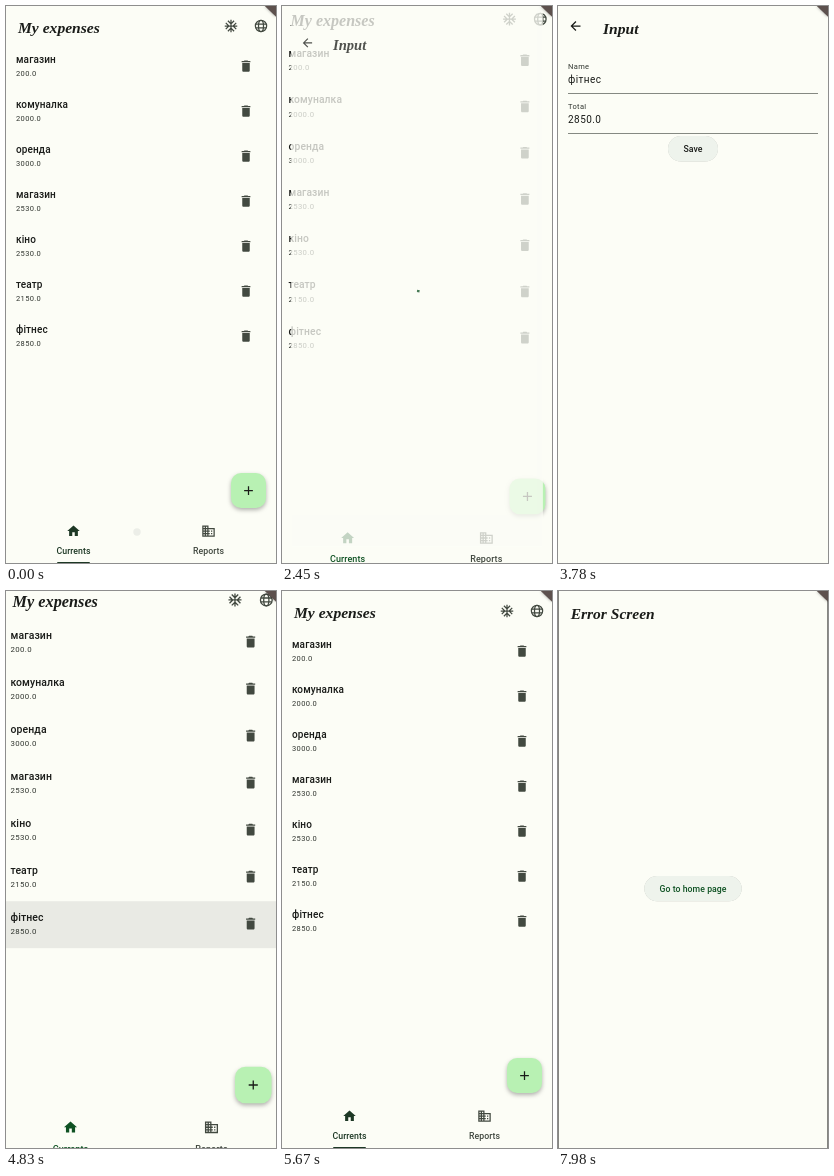
An HTML page for the animation above (8 s loop, 270 px wide and 557 px high).

```html
<!DOCTYPE html>
<html lang="uk">
<head>
<meta charset="utf-8">
<title>My expenses</title>
<style>
  html, body { margin: 0; width: 100%; height: 100%; overflow: hidden; background: #fcfdf6; }
  svg { display: block; width: 100vw; height: 100vh; }
  text { font-family: Roboto, "Noto Sans", sans-serif; fill: #1a1c19; }
  .script { font: italic bold 15.6px "Liberation Serif", serif; }
  .item { font-size: 10px; font-weight: 500; letter-spacing: .1px; }
  .small { font-size: 7.5px; letter-spacing: .35px; fill: #30352f; }
  .value { font-size: 10px; letter-spacing: .45px; }
  .label { font-size: 8.75px; font-weight: 500; letter-spacing: .06px; text-anchor: middle; }
  .icon { fill: #424940; }
  .line { fill: none; stroke: #424940; stroke-width: 2; }
  .dark { fill: #1a1c19; }
  .accent { fill: var(--accent); }
  .page { fill: #fcfdf6; }
  .pill { fill: #eef3ec; filter: drop-shadow(0 .8px .4px rgba(0,0,0,.25)); }
  .fab { fill: #b8f1b3; filter: drop-shadow(0 2px 2px rgba(0,0,0,.3)); }
  .banner { fill: #5d514e; filter: drop-shadow(0 0 1.5px rgba(0,0,0,.4)); }
</style>
</head>
<body>
<svg viewBox="0 0 270 557" preserveAspectRatio="none">
  <g id="home"></g>
  <rect id="scrim" width="270" height="557"/>
  <g id="input"></g>
  <g id="error"></g>
  <path class="banner" d="M258.8 0H270V10.8Z"/>
</svg>
<script>
const $ = id => document.getElementById(id);
const LOOP = 8000, STEP = 70, CX = 135, CY = 270;
const GREEN = '#0f5223';

const paths = {
  bin: 'M6 19c0 1.1.9 2 2 2h8c1.1 0 2-.9 2-2V7H6zM19 4h-3.5l-1-1h-5l-1 1H5v2h14z',
  house: 'M10 20v-6h4v6h5v-8h3L12 3 2 12h3v8z',
  back: 'M20 11H7.83l5.59-5.59L12 4l-8 8 8 8 1.41-1.41L7.83 13H20z',
  plus: 'M19 13h-6v6h-2v-6H5v-2h6V5h2v6h6z',
  office: 'M12 7V3H2v18h20V7zM6 19H4v-2h2zm0-4H4v-2h2zm0-4H4V9h2zm0-4H4V5h2z' +
    'm4 12H8v-2h2zm0-4H8v-2h2zm0-4H8V9h2zm0-4H8V5h2zm10 12h-8v-2h2v-2h-2v-2h2v-2h-2V9h8z' +
    'm-2-8h-2v2h2zm0 4h-2v2h2z'
};

// Icons live on a 24 unit grid and are drawn 15 px wide.
const place = (x, y, body) => `<g transform="translate(${x - 7.5} ${y - 7.5}) scale(.625)">${body}</g>`;
const icon = (name, x, y, cls = 'icon') => place(x, y, `<path class="${cls}" fill-rule="evenodd" d="${paths[name]}"/>`);
const text = (cls, x, y, s) => `<text class="${cls}" x="${x}" y="${y}">${s}</text>`;
const sheet = '<rect class="page" y="-20" width="270" height="580"/>';
const pill = (x, y, w, label, color) =>
  `<rect class="pill" x="${x}" y="${y}" width="${w}" height="25.5" rx="12.75"/>` +
  `<text class="label" x="135" y="${y + 16}" style="fill:${color}">${label}</text>`;

const flake = [0, 90, 180, 270].map(a =>
  `<path class="line" transform="rotate(${a} 12 12)" d="M12 2V12M7.05 3.64L12 8.6 16.95 3.64"/>`).join('');
const globe = '<g class="line"><circle cx="12" cy="12" r="9"/><ellipse cx="12" cy="12" rx="4" ry="9"/>' +
  '<path d="M3.6 9H20.4M3.6 15H20.4"/></g>';

const expenses = [['магазин', 200], ['комуналка', 2000], ['оренда', 3000], ['магазин', 2530],
  ['кіно', 2530], ['театр', 2150], ['фітнес', 2850]];

$('home').innerHTML = sheet +
  text('script', 12, 27, 'My expenses') + place(225, 20, flake) + place(255, 20, globe) +
  '<rect id="press" y="308.5" width="270" height="45"/>' +
  expenses.map(([name, sum], i) => text('item', 10, 57 + 45 * i, name) +
    text('small', 10, 70 + 45 * i, sum.toFixed(1)) + icon('bin', 240, 60 + 45 * i)).join('') +
  '<rect class="fab" x="225" y="467" width="35" height="35" rx="10"/>' + icon('plus', 242.5, 484.5, 'dark') +
  '<circle id="tap" cx="131" cy="526" r="3.7" fill="#eceee8"/>' +
  icon('house', 67.5, 525, 'accent') + icon('office', 202.5, 525) +
  text('label accent', 67.5, 548.3, 'Currents') + text('label icon', 202.5, 548.3, 'Reports') +
  '<path class="accent" d="M51 557Q51 556 52 556H83Q84 556 84 557Z"/>';

const field = (y, label, value) => text('small', 10, y, label) + text('value', 10, y + 14.3, value) +
  `<rect x="10" y="${y + 24}" width="250" height="1" fill="#858982"/>`;
$('input').innerHTML = sheet + icon('back', 17.5, 20, 'dark') + text('script', 45, 27.5, 'Input') +
  `<path id="spinner" fill="none" stroke="${GREEN}" stroke-width="2.5" stroke-linecap="square"/>` +
  '<g id="form">' + field(63, 'Name', 'фітнес') + field(103, 'Total', '2850.0') +
  pill(110, 130, 50, 'Save', '#1a1c19') + '</g>';

$('error').innerHTML = sheet + text('script', 12, 27, 'Error Screen') +
  pill(86, 285, 98, 'Go to home page', GREEN);

const span = (t, a, b) => Math.min(1, Math.max(0, (t - a) / (b - a)));

function bezier(x1, y1, x2, y2) {
  const at = (a, b, p) => 3 * (1 - p) ** 2 * p * a + 3 * (1 - p) * p * p * b + p ** 3;
  return x => {
    let lo = 0, hi = 1;
    for (let i = 0; i < 24; i++) {
      const mid = (lo + hi) / 2;
      if (at(x1, x2, mid) < x) lo = mid; else hi = mid;
    }
    return at(y1, y2, lo);
  };
}
const rise = bezier(.05, 0, .133333, .06), settle = bezier(.208333, .82, .25, 1);
const soft = bezier(.4, 0, .2, 1);
const zoomEase = t => t < 1 / 6 ? .4 * rise(t * 6) : .4 + .6 * settle((t - 1 / 6) / (5 / 6));

function show(id, scale, opacity) {
  $(id).setAttribute('transform', `translate(${CX} ${CY}) scale(${scale}) translate(${-CX} ${-CY})`);
  $(id).setAttribute('opacity', opacity);
}

// A new page grows and fades in over the home page.
function push(id, t) {
  const k = zoomEase(t);
  show('home', 1 + .05 * k, 1);
  show(id, .85 + .15 * k, span(t, .125, .25));
  $('scrim').setAttribute('opacity', .6 * span(t, .225, .42));
}

function pop(id, t) {
  const k = zoomEase(t);
  show('home', 1.1 - .1 * k, 1);
  show(id, 1 - .1 * k, 1 - span(t, .0825, .2075));
}

function spin(ms) {
  const c = ms / 1333 % 1, full = 1.5 * Math.PI, r = 10.4, cy = 296.5;
  const head = soft(span(c, 0, .5)) * full, tail = soft(span(c, .5, 1)) * full;
  const a = -Math.PI / 2 + tail + ms / 2222 * 2 * Math.PI + c * Math.PI / 2;
  const sweep = Math.max(head - tail, .001);
  const point = q => `${CX + r * Math.cos(q)} ${cy + r * Math.sin(q)}`;
  $('spinner').setAttribute('d', `M${point(a)}A${r} ${r} 0 ${+(sweep > Math.PI)} 1 ${point(a + sweep)}`);
}

function draw(now) {
  const t = Math.floor(now % LOOP / STEP) * STEP;
  const loaded = t >= 3290;
  show('home', 1, 1);
  show('input', 1, 0);
  show('error', 1, 0);
  $('scrim').setAttribute('opacity', 0);

  if (t >= 7840) push('error', span(t, 7809, 8109));
  else if (t >= 4760) pop('input', span(t, 4763, 5063));
  else if (t >= 2450) push('input', span(t, 2384, 2684));

  const vivid = t >= 2450 && t < 5670 || t >= 7840;
  document.body.style.setProperty('--accent', vivid ? GREEN : '#1d3825');
  $('tap').setAttribute('opacity', 1 - span(t, 0, 140));
  $('press').setAttribute('opacity', t < 4760 ? 0 : .075 * (1 - span(t, 4830, 5110)));
  $('form').setAttribute('opacity', +loaded);
  $('spinner').setAttribute('opacity', +!loaded);
  spin(Math.max(0, t - 2420));
}

const start = performance.now();
function tick() {
  draw(performance.now() - start);
  requestAnimationFrame(tick);
}
tick();
</script>
</body>
</html>
```
